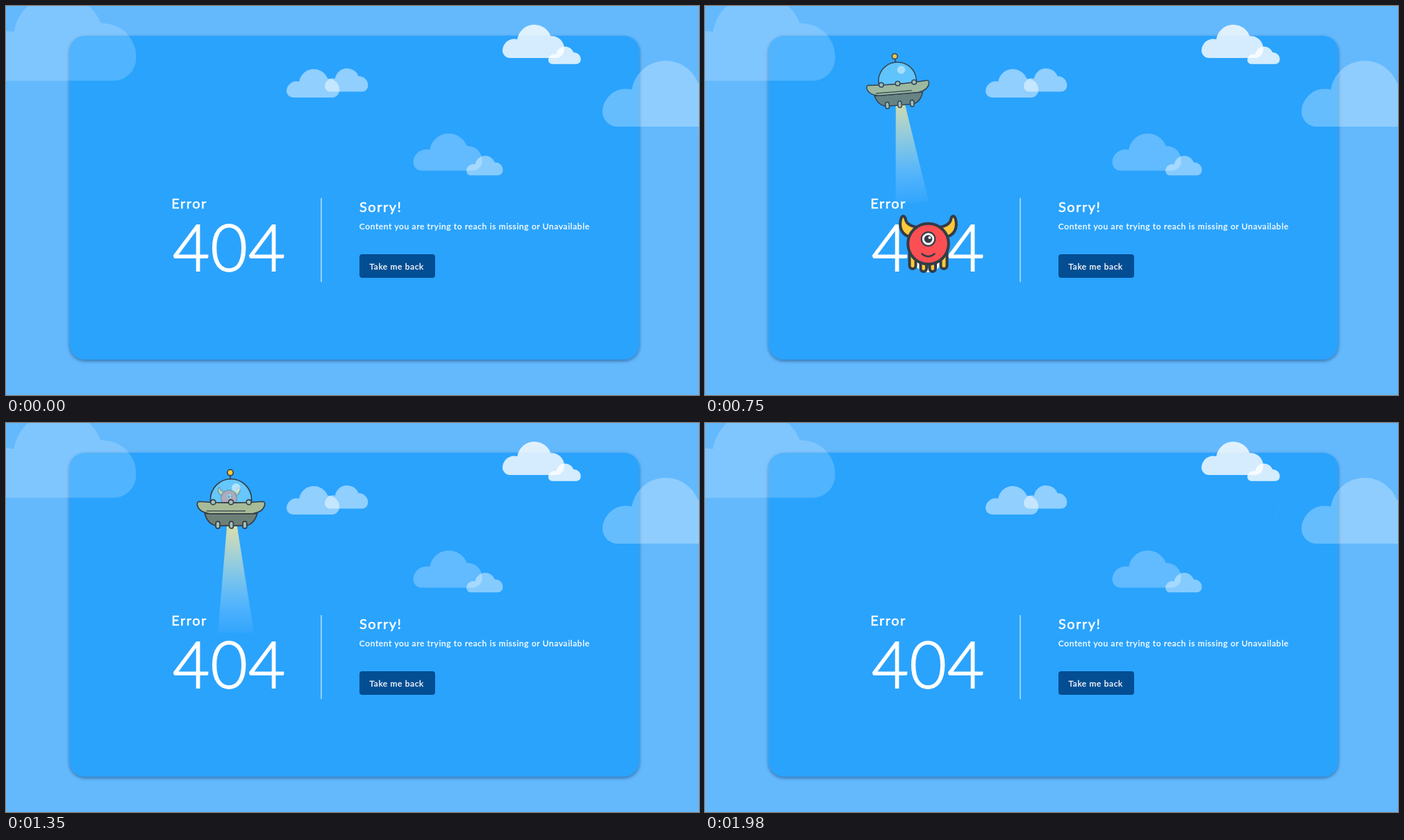
Animation, 998 px wide and 561 px high, one loop 3.3 s. Source, as an HTML page:

```html
<!DOCTYPE html>
<html lang="en">
<head>
<meta charset="utf-8">
<title>Error 404</title>
<style>
  html, body { margin: 0; width: 100%; height: 100%; overflow: hidden; background: #64b9fd; }
  svg { display: block; width: 100%; height: 100%; }
  text { font-family: Lato, "Open Sans", sans-serif; fill: #fff; stroke: #fff; stroke-width: .3px; }
  .head { font-size: 20px; letter-spacing: 1.5px; stroke-width: .55px; }
  .body { font-size: 12px; letter-spacing: .64px; }
  .code { font-size: 92px; font-weight: 300; letter-spacing: 1.1px; stroke-width: 1.8px; }
  .line { stroke: #333d47; stroke-linejoin: round; stroke-linecap: round; }
</style>
</head>
<body>
<svg viewBox="0 0 998 561" xmlns="http://www.w3.org/2000/svg">
  <defs>
    <path id="cloud" d="M11 48A11 11 0 0 1 0 37A17 17 0 0 1 21.3 21A25 25 0 0 1 69.4 16.2A18.5 18.5 0 0 1 89 35A12.5 12.5 0 0 1 76.5 48Z"/>
    <linearGradient id="ray" x1="0" y1="0" x2="0" y2="1">
      <stop offset="0" stop-color="#f4e6a0" stop-opacity=".88"/>
      <stop offset=".5" stop-color="#e4f0d4" stop-opacity=".42"/>
      <stop offset=".8" stop-color="#cfe6ff" stop-opacity=".2"/>
      <stop offset="1" stop-color="#c8e0ff" stop-opacity=".05"/>
    </linearGradient>
    <filter id="shade" x="-5%" y="-5%" width="110%" height="110%">
      <feDropShadow dx="0" dy="2" stdDeviation="2.5" flood-color="#0a3c6e" flood-opacity=".6"/>
    </filter>
  </defs>

  <rect width="998" height="561" fill="#64b9fd"/>
  <rect x="91.5" y="43" width="820.5" height="467" rx="22" fill="#2ca3fd" filter="url(#shade)"/>
  <g id="sky" fill="#fff"></g>

  <text class="head" x="238.3" y="292">Error</text>
  <text class="code" x="240" y="382">404</text>
  <path d="M454 277V398" stroke="#fff"/>
  <text class="head" x="509" y="297">Sorry!</text>
  <text class="body" x="508.7" y="322.3">Content you are trying to reach is missing or Unavailable</text>
  <rect x="509" y="358" width="109" height="34" rx="4" fill="#034d93"/>
  <text class="body" x="523.5" y="379.6">Take me back</text>

  <path id="beam" d="M-6 28H9L34 187H-19.5Z" fill="url(#ray)"/>

  <g id="monster" class="line" stroke-width="4">
    <g fill="#fdc93a">
      <rect x="-27" y="10" width="9" height="26" rx="4.5"/>
      <rect x="18" y="10" width="9" height="26" rx="4.5"/>
      <rect x="-11" y="22" width="8.5" height="18" rx="4.2"/>
      <rect x="2" y="22" width="8.5" height="18" rx="4.2"/>
      <path id="horn" d="M-24-10C-38-11-43-24-39-37Q-36-43-33-37C-32-28-24-25-15-24Z"/>
      <use href="#horn" transform="scale(-1 1)"/>
    </g>
    <circle r="29.3" fill="#fc4f53"/>
    <circle cy="-7" r="9.8" fill="#fff" stroke-width="2.2"/>
    <circle cy="-7" r="5.8" fill="#333d47" stroke="none"/>
    <circle cx="2" cy="-9" r="2" fill="#fff" stroke="none"/>
    <path d="M-9 14.5Q0 22 9 14.5" fill="none" stroke-width="2.6"/>
  </g>

  <g id="ship" class="line" stroke-width="1.7">
    <path d="M-1-47V-41" fill="none"/>
    <circle cx="-1" cy="-51" r="4.4" fill="#fdc93a"/>
    <path d="M-30.5-6V-11A30.5 30.5 0 0 1 30.5-11V-6Z" fill="#98e6fb" fill-opacity=".55"/>
    <circle cx="7.5" cy="-28.5" r="6.5" fill="#fff" fill-opacity=".5" stroke="none"/>
    <path d="M-39 10Q-34 27-20 28H20Q34 27 39 10Z" fill="#6d8078"/>
    <path d="M-47-8Q-51-8-50-2Q-47 8-32 10H32Q47 8 50-2Q51-8 47-8Q0-4-47-8Z" fill="#a7bb98"/>
    <path d="M-36 6H21" fill="none" stroke-width="1.4"/>
    <g id="bolts" fill="#a9c0b4"></g>
  </g>
</svg>
<script>
const LOOP = 3300, STEP = 30;
const $ = id => document.getElementById(id);
const clamp = v => Math.max(0, Math.min(1, v));
const mix = (a, b, p) => a + (b - a) * p;

// x, y, scale, opacity
const clouds = [
  [-44, -17, 2.6, .18], [859, 79, 1.98, .28],
  [404, 91, .855, .48], [459, 90, .7, .48],
  [586.5, 184, 1.115, .26], [663, 216, .59, .43],
  [715, 27, 1, .8], [781, 58.5, .525, .8]
];
$('sky').innerHTML = clouds.map(([x, y, s, o]) =>
  `<use href="#cloud" transform="translate(${x} ${y}) scale(${s})" opacity="${o}"/>`).join('');
$('bolts').innerHTML = [-1, 0, 1].map(i =>
  `<circle cx="${i * 26.5}" cy="-7" r="3.7"/>
   <rect x="${i * 20 - 2.5}" y="21.5" width="6" height="10.5" rx="3"/>`).join('');

// time, x, y, scale, tilt of the ship
const path = [
  [0, 93, 148, .12, -20],
  [540, 201, 117, .71, -9.3],
  [750, 278, 118, .895, -4.8],
  [1050, 313.7, 119.5, 1, -1.6],
  [1140, 317, 120, 1.01, -1],
  [1350, 324, 121, .97, 0],
  [1500, 454.5, 118.3, .84, 5.2],
  [1620, 578, 117, .66, 9],
  [1980, 828, 115, .15, 20]
];

const slope = (i, k) => path[i] && path[i + 1]
  ? (path[i + 1][k] - path[i][k]) / (path[i + 1][0] - path[i][0]) : 0;

function tangent(i, k) {
  const a = slope(i - 1, k), b = slope(i, k);
  return a * b > 0 ? 2 * a * b / (a + b) : 0;
}

// monotone cubic through the path points
function sample(t, k) {
  const last = path.length - 1;
  if (t >= path[last][0]) return path[last][k];
  let i = 0;
  while (t >= path[i + 1][0]) i++;
  const h = path[i + 1][0] - path[i][0], u = (t - path[i][0]) / h, v = 1 - u;
  return path[i][k] * (1 + 2 * u) * v * v + path[i + 1][k] * u * u * (3 - 2 * u)
    + h * u * v * (tangent(i, k) * v - tangent(i + 1, k) * u);
}

function place(el, x, y, scale, turn, opacity) {
  el.setAttribute('transform', `translate(${x} ${y}) rotate(${turn}) scale(${scale})`);
  el.setAttribute('opacity', opacity);
}

function draw(time) {
  const t = Math.floor(time % LOOP / STEP) * STEP;
  const [x, y, s, turn] = [1, 2, 3, 4].map(k => sample(t, k));
  const alpha = clamp((s - .12) / .85);
  place($('beam'), x, y, s, turn, alpha);
  place($('ship'), x, y, s, turn, alpha);

  // the monster is lifted into the dome and then rides along
  const p = (1 - Math.cos(Math.PI * clamp((t - 984) / 330))) / 2;
  const a = turn * Math.PI / 180;
  const seatX = x + s * (-3 * Math.cos(a) + 13 * Math.sin(a));
  const seatY = y + s * (-3 * Math.sin(a) - 13 * Math.cos(a));
  place($('monster'), mix(321.5, seatX, p), mix(343, seatY, p),
    mix(1, .4 * s, p ** .7), turn * p + 10.5 * Math.sin(Math.PI * Math.sqrt(p)),
    t < STEP ? 0 : mix(1, .85 * alpha, p));
}

let start;
function tick(now) {
  start ??= now;
  draw(now - start);
  requestAnimationFrame(tick);
}
draw(0);
requestAnimationFrame(tick);
</script>
</body>
</html>
```
